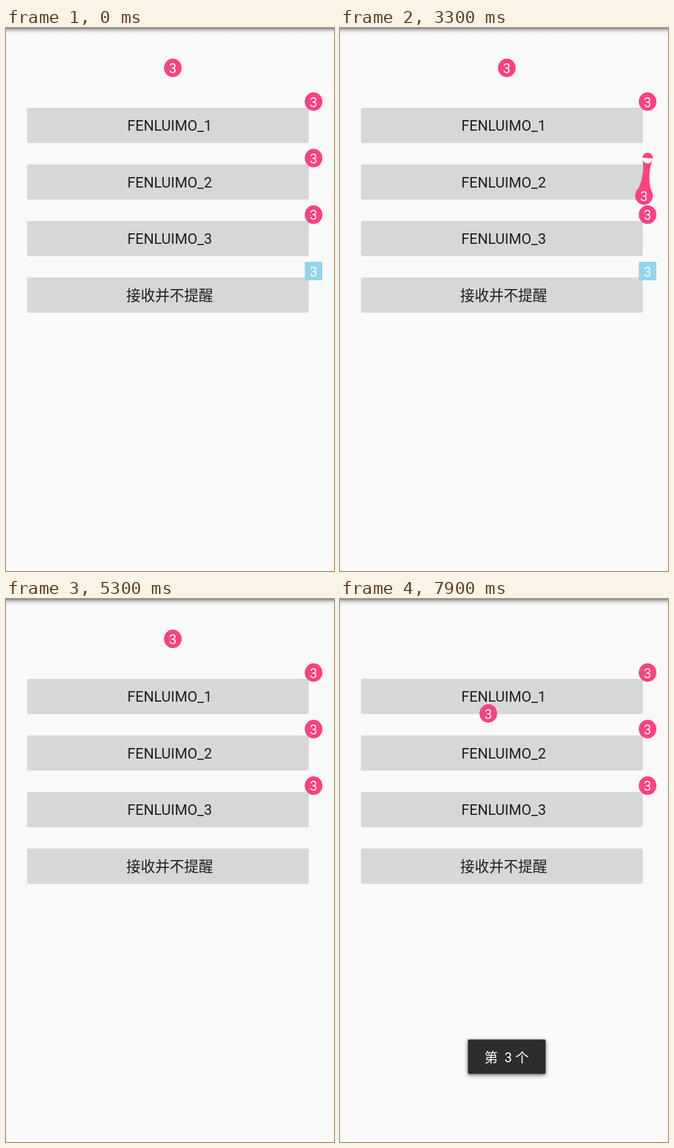
Animation, 532 px wide and 878 px high, one loop 8 s. Source, as an HTML page:

```html
<!DOCTYPE html>
<html lang="zh">
<head>
<meta charset="utf-8">
<title>Draggable badges</title>
<style>
  html, body { margin: 0; width: 100%; height: 100%; overflow: hidden; background: #f9f9f9; }
  svg { display: block; width: 532px; height: 878px; }
  text { font-family: Roboto, "Noto Sans CJK SC", "Noto Sans CJK", sans-serif; text-anchor: middle; white-space: pre; }
  .button rect { fill: #d6d8d7; }
  .button text { font-size: 23.5px; fill: #1d1d1d; }
  .badge text { font-size: 22px; fill: #fff; }
  .pink { fill: #ff4081; }
  .blue { fill: #93d5ec; }
  #toast rect { fill: #2d2d2d; filter: drop-shadow(0 2px 3px rgba(0, 0, 0, .6)); }
  #toast text { font-size: 21.8px; fill: #fff; }
</style>
</head>
<body>
<svg viewBox="0 0 532 878">
  <defs>
    <linearGradient id="shade" x2="0" y2="1">
      <stop offset="0" stop-color="#000" stop-opacity=".5"/>
      <stop offset=".2" stop-color="#000" stop-opacity=".27"/>
      <stop offset=".55" stop-color="#000" stop-opacity=".07"/>
      <stop offset="1" stop-color="#000" stop-opacity="0"/>
    </linearGradient>
  </defs>
  <rect width="532" height="878" fill="#f9f9f9"/>
  <rect width="532" height="11" fill="url(#shade)"/>
  <g class="button"><rect x="34" y="129" width="457" height="57" rx="3"/><text x="265.5" y="166.3">FENLUIMO_1</text></g>
  <g class="button"><rect x="34" y="220.4" width="457" height="57" rx="3"/><text x="265.5" y="257.7">FENLUIMO_2</text></g>
  <g class="button"><rect x="34" y="311.9" width="457" height="57" rx="3"/><text x="265.5" y="349.2">FENLUIMO_3</text></g>
  <g class="button"><rect x="34" y="403.4" width="457" height="57" rx="3"/><text x="265.5" y="441">接收并不提醒</text></g>
  <g id="badges"></g>
  <g id="toast" opacity="0">
    <rect x="207.5" y="712.3" width="126" height="55.5" rx="2"/>
    <text x="270.3" y="748.5" xml:space="preserve">第  3 个</text>
  </g>
</svg>
<script>
  const LOOP = 8000, STEP = 100, SNAP = 100, RX = 14.3, RY = 15;
  const NS = 'http://www.w3.org/2000/svg';

  // path: [time, x, y]; hidden: [from, to]
  const badges = [
    { home: [270.5, 64.5], hidden: [],
      path: [[7500, 270.5, 64.5], [7600, 269, 70], [7700, 263, 100], [7800, 251, 150], [7900, 240.5, 185]] },
    { home: [498.8, 119], hidden: [], path: [] },
    { home: [498.8, 210.3], hidden: [],
      path: [[2700, 498.8, 210.3], [2800, 494.7, 212.4], [2900, 493.2, 224], [3100, 492.4, 258],
             [3200, 492.6, 268], [3300, 493, 271], [3400, 499, 204.2], [3500, 498.8, 210.3]] },
    { home: [498.8, 301.8], hidden: [[900, 1200]],
      path: [[1100, 498.8, 301.8], [1200, 497.5, 307], [1300, 494.5, 322], [1400, 490.5, 341], [1500, 487, 356.7],
             [1600, 485.3, 362.8], [1700, 485.8, 360], [1800, 495, 320], [1900, 498.8, 301], [2100, 498.8, 301.8]] },
    { home: [498.9, 393], square: true, hidden: [[3800, 3900], [5300, 5400], [6200, LOOP]],
      path: [[3800, 498.9, 393], [3900, 482.7, 471], [4000, 462.8, 544.4], [4100, 473, 530], [4200, 498, 502],
             [4300, 516, 474], [4400, 517.5, 455], [4500, 507, 438], [4600, 499.6, 427], [4700, 499.6, 423],
             [4800, 499.6, 423], [4900, 498.9, 393], [5300, 498.9, 393], [5400, 496, 412], [5600, 475, 470],
             [5800, 446, 532], [5900, 439.5, 544], [6000, 450.5, 533]] }
  ];
  const fade = [[6200, 0], [6300, .06], [6400, .25], [6500, .55], [6600, .85], [6700, 1]];

  function make(parent, tag, attrs) {
    const el = document.createElementNS(NS, tag);
    for (const key in attrs) el.setAttribute(key, attrs[key]);
    return parent.appendChild(el);
  }

  function sample(keys, t) {
    const next = keys.findIndex(k => k[0] > t);
    if (next < 0) return keys[keys.length - 1].slice(1);
    if (next === 0) return keys[0].slice(1);
    const a = keys[next - 1], b = keys[next], p = (t - a[0]) / (b[0] - a[0]);
    return a.slice(1).map((v, i) => v + (b[i + 1] - v) * p);
  }

  // Elastic neck: two quadratic sides bent toward the midpoint, plus the anchor disc
  function neck([ax, ay], [bx, by]) {
    const dx = bx - ax, dy = by - ay, d = Math.hypot(dx, dy);
    if (d < 1 || d > SNAP) return '';
    const r = 13.2 - .075 * d, nx = -dy / d, ny = dx / d;
    const at = (x, y, off) => `${x + nx * off} ${y + ny * off}`;
    const mid = `${(ax + bx) / 2} ${(ay + by) / 2}`;
    return `M${at(ax, ay, r)}Q${mid} ${at(bx, by, RX)}L${at(bx, by, -RX)}Q${mid} ${at(ax, ay, -r)}` +
      `A${r} ${r} 0 1 1 ${at(ax, ay, r)}A${r} ${r} 0 0 1 ${at(ax, ay, -r)}Z`;
  }

  const layer = document.getElementById('badges');
  const toast = document.getElementById('toast');

  for (const b of badges) {
    b.root = make(layer, 'g', { class: 'badge' });
    b.neck = make(b.root, 'path', { class: 'pink' });
    b.body = make(b.root, 'g', {});
    if (b.square) make(b.body, 'rect', { class: 'blue', x: -14.2, y: -15, width: 28.4, height: 30 });
    else make(b.body, 'ellipse', { class: 'pink', rx: RX, ry: RY });
    make(b.body, 'text', { y: 8.5 }).textContent = '3';
  }

  function draw() {
    const t = Math.floor(performance.now() % LOOP / STEP) * STEP;
    for (const b of badges) {
      const pos = b.path.length ? sample(b.path, t) : b.home;
      const off = b.hidden.some(([from, to]) => t >= from && t < to);
      b.root.setAttribute('visibility', off ? 'hidden' : 'visible');
      b.body.setAttribute('transform', `translate(${pos})`);
      b.neck.setAttribute('d', b.square ? '' : neck(b.home, pos));
    }
    toast.setAttribute('opacity', sample(fade, t)[0]);
    requestAnimationFrame(draw);
  }
  draw();
</script>
</body>
</html>
```
